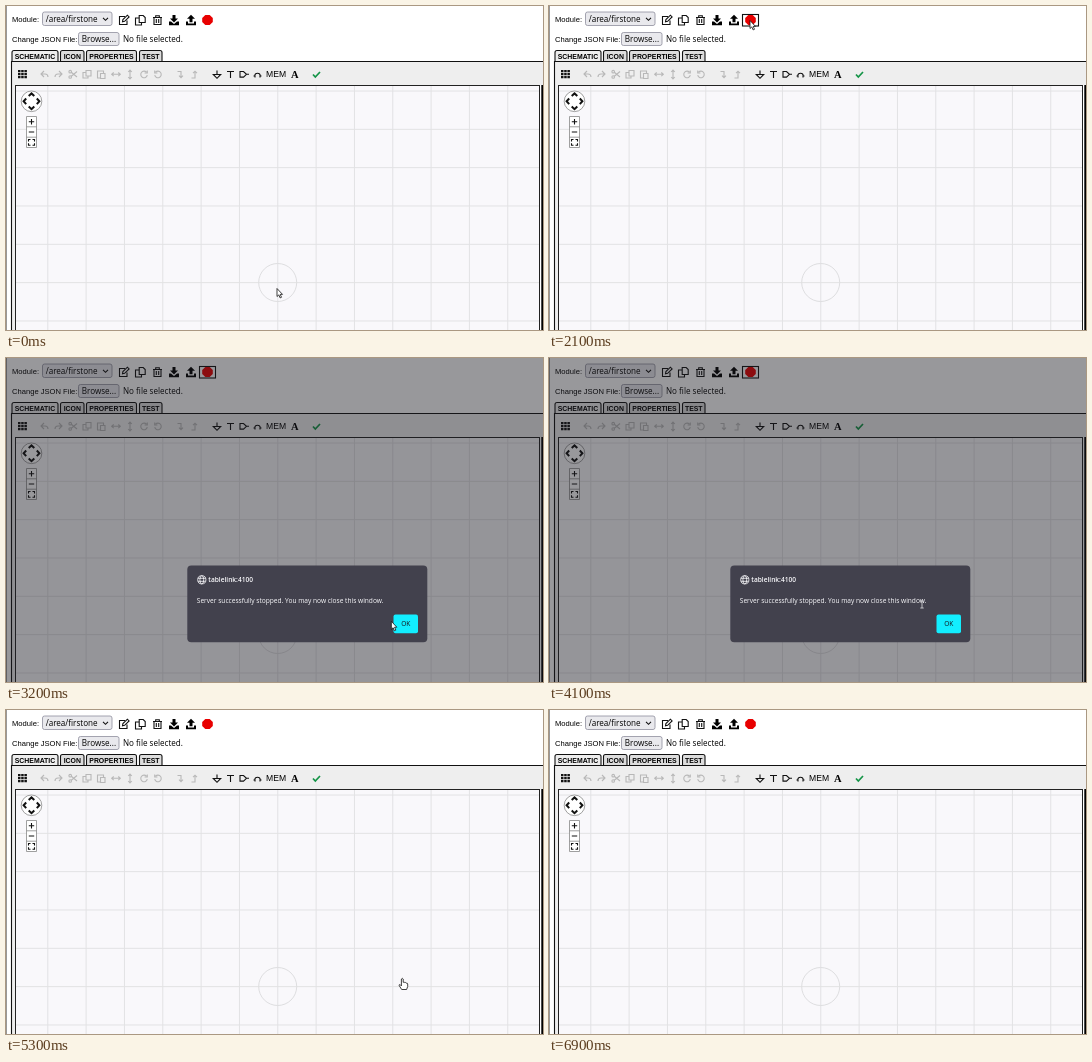
These frames come from a looping animation (537 px wide and 324 px high, 7000 ms). An HTML page:

```html
<!DOCTYPE html>
<html lang="en">
<head>
<meta charset="utf-8">
<title>Stop server</title>
<style>
  html, body { margin: 0; width: 100%; height: 100%; overflow: hidden; background: #fff; }
  svg { display: block; width: 537px; height: 324px; }
  text { font-family: "Liberation Sans", Arial, sans-serif; }
  .ui { font-family: "Open Sans", "Noto Sans", sans-serif; font-size: 8.1px; }
  .label { font-size: 7.6px; }
  .tab { font-size: 6.9px; font-weight: bold; }
  .dialog { font-size: 6.6px; fill: #fbfbfe; }
  .line { fill: none; stroke: #111; stroke-width: 1.1; }
  .off { fill: none; stroke: #b8b8b8; stroke-width: 1.1; }
  .control { fill: #e9e9ed; stroke: #8f8f9d; stroke-width: .8; }
  .cursor path { fill: #fff; stroke: #111; stroke-width: .8; stroke-linejoin: round; }
</style>
</head>
<body>
<svg viewBox="0 0 537 324">
  <path d="M.5 0V324" stroke="#999"/>

  <text class="label" x="6" y="16.3">Module:</text>
  <rect class="control" x="36.5" y="6" width="69.5" height="13.5" rx="2"/>
  <text class="ui" x="39.7" y="15.9">/area/firstone</text>
  <path class="line" d="M97 11.8l2.5 2.5 2.5-2.5"/>
  <text class="label" x="6" y="35.8">Change JSON File:</text>
  <rect class="control" x="72.5" y="26.5" width="40.5" height="13" rx="2"/>
  <text class="ui" x="75.8" y="35.8">Browse...</text>
  <text class="ui" x="117" y="35.8">No file selected.</text>

  <g class="line">
    <path d="M119 10.5H113.5V18.5H121V14.5M116.5 15.8l.4-2.2 4.5-4.4 1.7 1.7-4.5 4.4z"/>
    <path d="M133.2 9.5h4l2 2v5h-6zM133 12h-3.5v7h6v-2.3"/>
    <path d="M147 11.5h9M149.7 11V9.7h3.6V11M148 11.5v7h7v-7M150.3 13v4M152.7 13v4"/>
  </g>
  <path d="M166.5 9h3v3.5h2.5l-4 4-4-4h2.5zM163 15.5h2l3 2.5 3-2.5h2v3.7h-10z"/>
  <path d="M183.5 16.2h3v-3.5h2.5l-4-4-4 4h2.5zM180 15.5h2v2h6v-2h2v3.7h-10z"/>
  <rect id="focus" class="line" x="193.5" y="8.5" width="16" height="11.5"/>
  <path d="M199.3 9h4.4l3.1 3v4l-3.1 3h-4.4l-3.1-3v-4z" fill="#e80000"/>

  <g id="tabs"></g>
  <path d="M5.5 324V55.5H537" fill="#eee" stroke="none"/>
  <rect x="6" y="56" width="531" height="268" fill="#eee"/>
  <path class="line" d="M5.5 324V55.5H537"/>

  <path d="M13 66.2h7M13 69.3h7" stroke="#eee" stroke-width=".8"/>
  <path d="M12 66h9M12 69h9M12 72h9" transform="translate(0 -.8)" stroke="#111" stroke-width="2.2" stroke-dasharray="2.5 .7"/>
  <g class="off">
    <path d="M38 65l-3 3 3 3M35 68h4q3 0 3 3"/>
    <path d="M53 65l3 3-3 3M56 68h-4q-3 0-3 3"/>
    <path d="M65 66l6 5M65 70.5l6-5"/>
    <circle cx="64.2" cy="65.7" r="1.3"/><circle cx="64.2" cy="71" r="1.3"/>
    <path d="M80 64.5h5v5.5h-5zM79.5 66.5h-2.5v5.5h5v-1.5"/>
    <path d="M94 72h-2.5v-7h6v2M94.5 67.5h4.5v5h-4.5z"/>
    <path d="M106 68.3h8M107.7 66.5l-2 1.8 2 1.8M112.3 66.5l2 1.8-2 1.8"/>
    <path d="M124 64.5v8M122.2 66l1.8-2 1.8 2M122.2 71l1.8 2 1.8-2"/>
    <path d="M140.5 66.2a3.3 3.3 0 1 0 .8 3M141.3 64.5v2.5h-2.7"/>
    <path d="M149.5 66.2a3.3 3.3 0 1 1-.8 3M148.7 64.5v2.5h2.7"/>
    <path d="M171.5 65.5h3.5v6M173 69.7l2 2 2-2"/>
    <path d="M185.5 72h3.5v-6.5M187 67.2l2-2 2 2"/>
  </g>
  <g class="line">
    <path d="M211 64.5v4M207.3 68.5h7.4l-3.7 3.8z"/>
    <path d="M221 65.5h7M224.5 65.5v6.5"/>
    <path d="M234 65.5h3.5l3 2.8-3 2.8H234zM240.5 68.3h2.5"/>
    <path d="M247.5 70h1.3a2.7 2.7 0 0 1 5.4 0h1.3M249 70v1.5M254 70v1.5"/>
  </g>
  <text x="260" y="71.4" font-size="8.6">MEM</text>
  <text x="285" y="71.8" font-size="10.5" font-weight="bold" style="font-family:'Liberation Serif',serif">A</text>
  <path d="M307 68.5l2.3 2.5 4.7-5" fill="none" stroke="#149447" stroke-width="1.7"/>

  <rect x="9.5" y="79.5" width="524" height="250" fill="#f9f8fb" stroke="#222"/>
  <path id="grid" fill="none" stroke="#e2e2e4"/>
  <circle cx="271.7" cy="276.5" r="19" fill="none" stroke="#dedee0"/>
  <path d="M534 79h1.5v245H534z" fill="#fff"/>
  <path d="M535.3 79H537V324h-1.7z"/>

  <circle cx="25.5" cy="95.3" r="10.3" fill="#fff" stroke="#888" stroke-width=".8"/>
  <path d="M22.7 90l2.8-2.6 2.8 2.6M22.7 100.6l2.8 2.6 2.8-2.6M20.2 92.5l-2.6 2.8 2.6 2.8M30.8 92.5l2.6 2.8-2.6 2.8" fill="none" stroke="#111" stroke-width="2"/>
  <path d="M20.5 110.5h10v31h-10zM20.5 120.8h10M20.5 131.2h10" fill="#fff" stroke="#888" stroke-width=".8"/>
  <path class="line" d="M22.8 115.7h5.4M25.5 113v5.4M22.8 126h5.4M22.5 135.5v-2h2M26.5 133.5h2v2M28.5 137.2v2h-2M24.5 139.2h-2v-2"/>

  <g id="modal">
    <rect width="537" height="324" fill="#1c1b22" fill-opacity=".45"/>
    <rect x="181.3" y="207.5" width="240" height="76.7" rx="4" fill="#42414d"/>
    <g fill="none" stroke="#fbfbfe" stroke-width=".8">
      <circle cx="195.8" cy="221.8" r="4.1"/>
      <ellipse cx="195.8" cy="221.8" rx="1.9" ry="4.1"/>
      <path d="M192 220.3h7.6M192 223.3h7.6"/>
    </g>
    <text class="ui dialog" x="202.3" y="224.2" font-weight="600">tablelink:4100</text>
    <text class="ui dialog" x="190.8" y="245">Server successfully stopped. You may now close this window.</text>
    <rect id="ok" x="387.5" y="256.5" width="24.5" height="18.8" rx="2"/>
    <text class="ui" x="399.8" y="268.3" text-anchor="middle" style="font-size:6.6px" fill="#15141a">OK</text>
  </g>

  <g id="arrow" class="cursor"><path d="M0 0v8l1.8-1.6 1.3 3 1.4-.6-1.3-2.9h2.3z"/></g>
  <g id="beam"><path d="M-1.7-3.5h3.4M0-3.5v7M-1.7 3.5h3.4" fill="none" stroke="#d0d0d4" stroke-width=".9"/></g>
  <g id="hand" class="cursor"><path d="M-1.8 6.5L-4.3 2.6q-.2-1.3 1-.9l1.2 1.2V-4q.9-1.4 1.8 0v3.3q1-.6 1.6.3 1-.4 1.5.5 1.2-.2 1.4.9v2.5L3.1 6.5z"/></g>
</svg>
<script>
const $ = id => document.getElementById(id);

$('tabs').innerHTML = [['SCHEMATIC', 6, 46], ['ICON', 54.5, 23.5], ['PROPERTIES', 80.5, 50], ['TEST', 133.5, 22.5]]
  .map(([name, x, w], i) => `<path class="line" style="fill:${i ? '#ddd' : '#eee'}"
    d="M${x} 56v-9.5q0-2 2-2h${w - 4}q2 0 2 2V56"/>
    <text class="tab" x="${x + w / 2}" y="52.7" text-anchor="middle">${name}</text>`).join('');

const CELL = 38.33;
let lines = '';
for (let x = 41.8; x < 533; x += CELL) lines += `M${x} 80V324`;
for (let y = 85; y < 324; y += CELL) lines += `M10 ${y}H533`;
$('grid').setAttribute('d', lines);

// Pointer path: time, x, y
const path = [
  [100, 271, 282.5], [800, 216, 72], [1300, 201, 14.5], [2500, 201, 14.5],
  [3000, 392, 262], [3300, 382, 264], [4000, 373, 246.5], [4200, 373, 246.5],
  [4800, 397, 268], [5200, 397, 268], [5300, 397.5, 273]
];

function pointerAt(t) {
  if (t <= path[0][0]) return path[0].slice(1);
  const i = path.findIndex(key => key[0] > t);
  if (i < 0) return path[path.length - 1].slice(1);
  const [t0, x0, y0] = path[i - 1], [t1, x1, y1] = path[i];
  const k = (t - t0) / (t1 - t0);
  return [x0 + (x1 - x0) * k, y0 + (y1 - y0) * k];
}

const inside = (x, y, left, top, right, bottom) => x >= left && x <= right && y >= top && y <= bottom;
const show = (id, on) => $(id).setAttribute('visibility', on ? 'visible' : 'hidden');

function draw(now) {
  const t = Math.floor(now % 7000 / 100) * 100;
  const [x, y] = pointerAt(t);
  const modal = t >= 2200 && t < 5300;
  const overText = modal && inside(x, y, 191, 237, 379, 249);
  const shape = t >= 5900 ? '' : t >= 5300 ? 'hand' : overText ? 'beam' : 'arrow';

  show('modal', modal);
  show('focus', t >= 1300 && t < 5300);
  $('ok').setAttribute('fill', inside(x, y, 388, 257, 412, 275) ? '#80ebff' : '#12eeff');
  for (const id of ['arrow', 'beam', 'hand']) {
    show(id, id === shape);
    $(id).setAttribute('transform', `translate(${x} ${y})`);
  }
  requestAnimationFrame(() => draw(performance.now()));
}
draw(performance.now());
</script>
</body>
</html>
```
